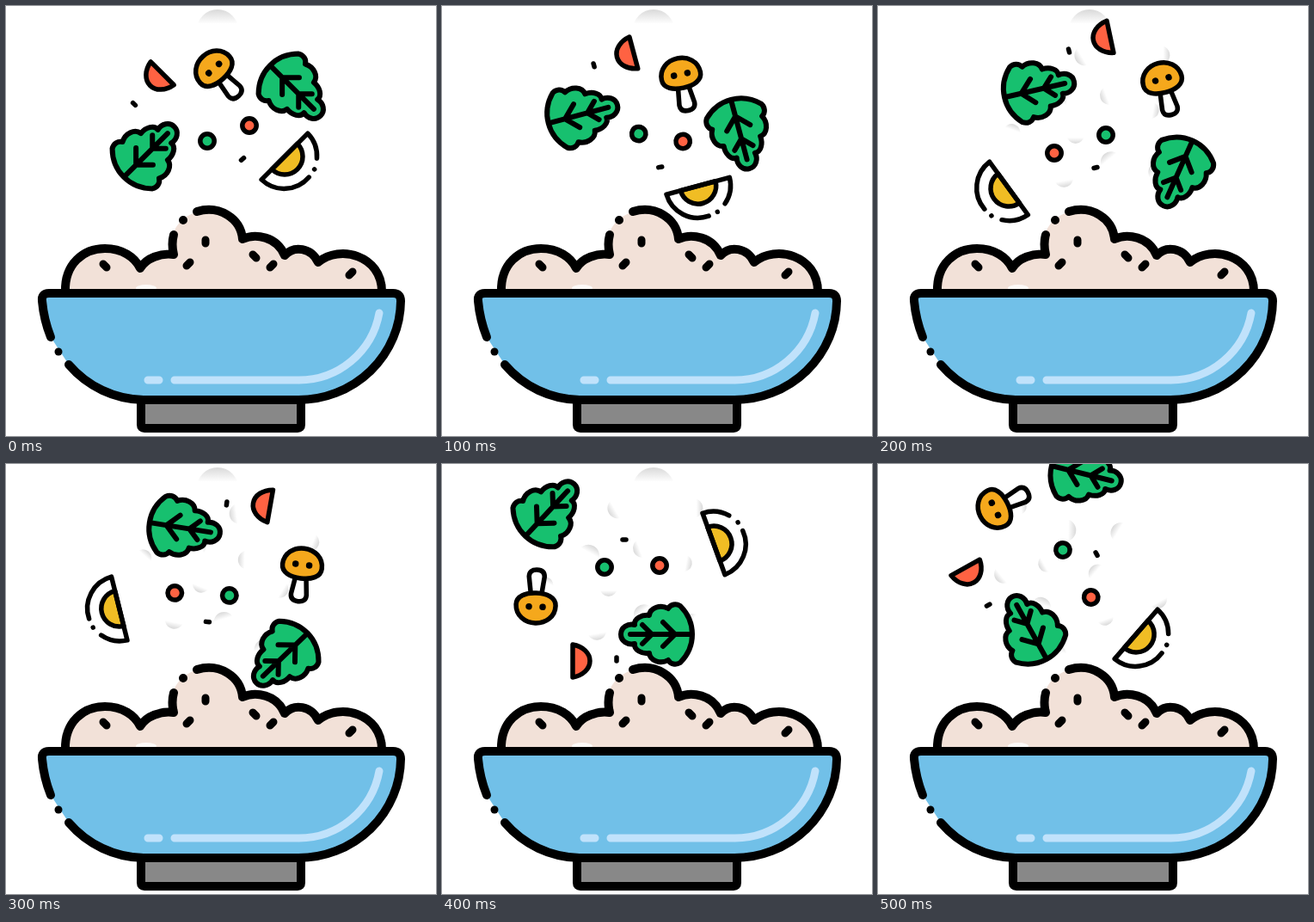
Animation, 500 px wide and 500 px high, one loop 600 ms. Source, as an HTML page:

```html
<!DOCTYPE html>
<html lang="en">
<head>
<meta charset="utf-8">
<title>Rice bowl</title>
<style>
  html, body { margin: 0; width: 100%; height: 100%; overflow: hidden; background: #fff; }
  svg { display: block; width: 100vw; height: 100vh; }
  .ink { stroke: #000; stroke-width: 5.5; stroke-linecap: round; stroke-linejoin: round; }
  .bold { stroke-width: 10; }
  .none { fill: none; }
</style>
</head>
<body>
<svg viewBox="0 0 500 500">
  <defs>
    <linearGradient id="shade" x1="0" y1="0" x2="0" y2="1">
      <stop offset=".65" stop-color="#aaa" stop-opacity="0"/>
      <stop offset="1" stop-color="#aaa" stop-opacity=".45"/>
    </linearGradient>

    <!-- tip points right -->
    <g id="leaf" class="ink" style="stroke-width:6">
      <path fill="#17c06f" d="M-27-33C-36-24-41-12-41 0S-36 24-27 33C-22 36-16 35-13 30C-4 35 8 31 9 22C18 23 27 18 26 11C34 13 42 8 42 0S34-13 26-11C27-18 18-23 9-22C8-31-4-35-13-30C-16-35-22-36-27-33Z"/>
      <path class="none" d="M-39 0H31M-7-14L-21 0L-7 14M17-11L6 0L17 11"/>
    </g>

    <g id="mushroom" class="ink">
      <path fill="#fff" d="M-6 14L-9 36Q-9 44 0 44T9 36L6 14Z"/>
      <path fill="#f5a81c" d="M-23 3C-23-10-12-18 0-18S23-10 23 3C23 13 12 17 0 17S-23 13-23 3Z"/>
      <path stroke-width="7.5" d="M-8 1h.01M8 1h.01" style="stroke-width:7.5"/>
    </g>

    <!-- flat side faces right -->
    <path id="tomato" class="ink" fill="#ff6242" d="M1-19C-11-17-19-9-19 0S-11 17 1 19Z"/>

    <g id="egg" class="ink">
      <path fill="#f0bd24" d="M0-21A21 21 0 0 0 0 21Z"/>
      <path class="none" d="M-37 3A38 38 0 0 1 0-38V38A38 38 0 0 1-28 25M-35 14h.01"/>
    </g>

    <circle id="pea" class="ink" r="8.2" fill="#17c06f"/>
    <circle id="berry" class="ink" r="8.2" fill="#ff6242"/>
    <path id="seed" class="ink" d="M-2 0H2"/>
    <circle id="smudge" r="1" fill="url(#shade)"/>
  </defs>

  <rect width="500" height="500" fill="#fff"/>
  <use href="#smudge" transform="translate(246 28) rotate(180) scale(24)"/>
  <g id="smudges"></g>

  <g class="ink bold">
    <path fill="#f2e1d8" stroke="none" d="M69 334C68 300 90 282 115 282C135 282 150 292 156 305C163 293 180 287 195 289C186 262 205 239 235 237C256 238 273 251 275 271C290 264 315 268 324 290C335 278 355 281 363 298C388 277 437 290 437 334Z"/>
    <ellipse cx="163" cy="328" rx="12" ry="4" fill="#fff" stroke="none" opacity=".8"/>
    <path class="none" d="M69 332C68 300 90 282 115 282C135 282 150 292 156 305C163 293 180 287 195 289Q192 277 195 266M206 249h.01M222 239C248 231 273 247 275 271C290 264 315 268 324 290C335 278 355 281 363 298C388 277 437 290 437 332"/>
    <path style="stroke-width:9" d="M113 300l4 4M210 302l4-4M232 272v4M287 289l4 4M307 304l4-4M399 313l4-4"/>
    <path fill="#888" d="M157 458V487Q157 491 161 491H339Q343 491 343 487V458Z"/>
    <path fill="#71c0e8" d="M52 385Q44 365 42 343Q41 334 50 334H450Q459 334 459 343A119 116 0 0 1 340 458H160A117 117 0 0 1 73 417"/>
    <path style="stroke-width:9" d="M61 402h.01"/>
    <path class="none" style="stroke:#c0e2fb;stroke-width:9" d="M434 357A95 95 0 0 1 340 435H196M165 435H178"/>
  </g>

  <g id="food"></g>
</svg>

<script>
  const STEP = 100;

  // Each toss shows its layout, then the same layout turned about a pivot
  const tosses = [
    { pivot: [247, 143], turn: 30 },
    { pivot: [255, 138], turn: 22 },
    { pivot: [219, 132], turn: 61 }
  ];

  // One [x, y, angle] per toss
  const items = [
    ["seed", [149,114,45], [222,52,75], [203,227,90]],
    ["seed", [275,178,-40], [253,188,-15], [212,88,0]],
    ["pea", [234,157], [265,150], [189,120]],
    ["berry", [283,139], [205,171], [253,118]],
    ["tomato", [181,79,-45], [269,36,-12], [153,229,180]],
    ["mushroom", [241,72,-42], [330,84,-15], [109,167,182]],
    ["egg", [324,175,-135], [152,212,-36], [316,93,160]],
    ["leaf", [166,170,-45], [187,97,-13], [125,54,-47]],
    ["leaf", [336,98,45], [349,194,114], [250,198,180]]
  ];

  const byId = id => document.getElementById(id);

  function add(parent, shape) {
    const el = document.createElementNS("http://www.w3.org/2000/svg", "use");
    el.setAttribute("href", "#" + shape);
    return byId(parent).appendChild(el);
  }

  function place(el, x, y, angle = 0, size = 1) {
    el.setAttribute("transform", `translate(${x} ${y}) rotate(${angle}) scale(${size})`);
  }

  const food = items.map(([shape, ...poses]) => ({ el: add("food", shape), poses }));

  // Faint blots on a golden-angle spiral
  for (let i = 0; i < 10; i++) {
    const a = 2.7 + 2.4 * i, r = 28 + 9 * i;
    place(add("smudges", "smudge"), r * Math.cos(a), r * Math.sin(a), 70 * i, 10 + i % 4);
  }

  function draw(time) {
    const step = Math.floor(time / STEP) % (2 * tosses.length);
    const toss = step >> 1;
    const { pivot: [x, y], turn } = tosses[toss];
    const angle = step % 2 * turn;
    food.forEach(({ el, poses }) => place(el, ...poses[toss]));
    byId("food").setAttribute("transform", `rotate(${angle} ${x} ${y})`);
    place(byId("smudges"), x, y, angle, toss ? 1 : 0);
  }

  const start = performance.now();
  function tick() {
    draw(performance.now() - start);
    requestAnimationFrame(tick);
  }
  tick();
</script>
</body>
</html>
```
